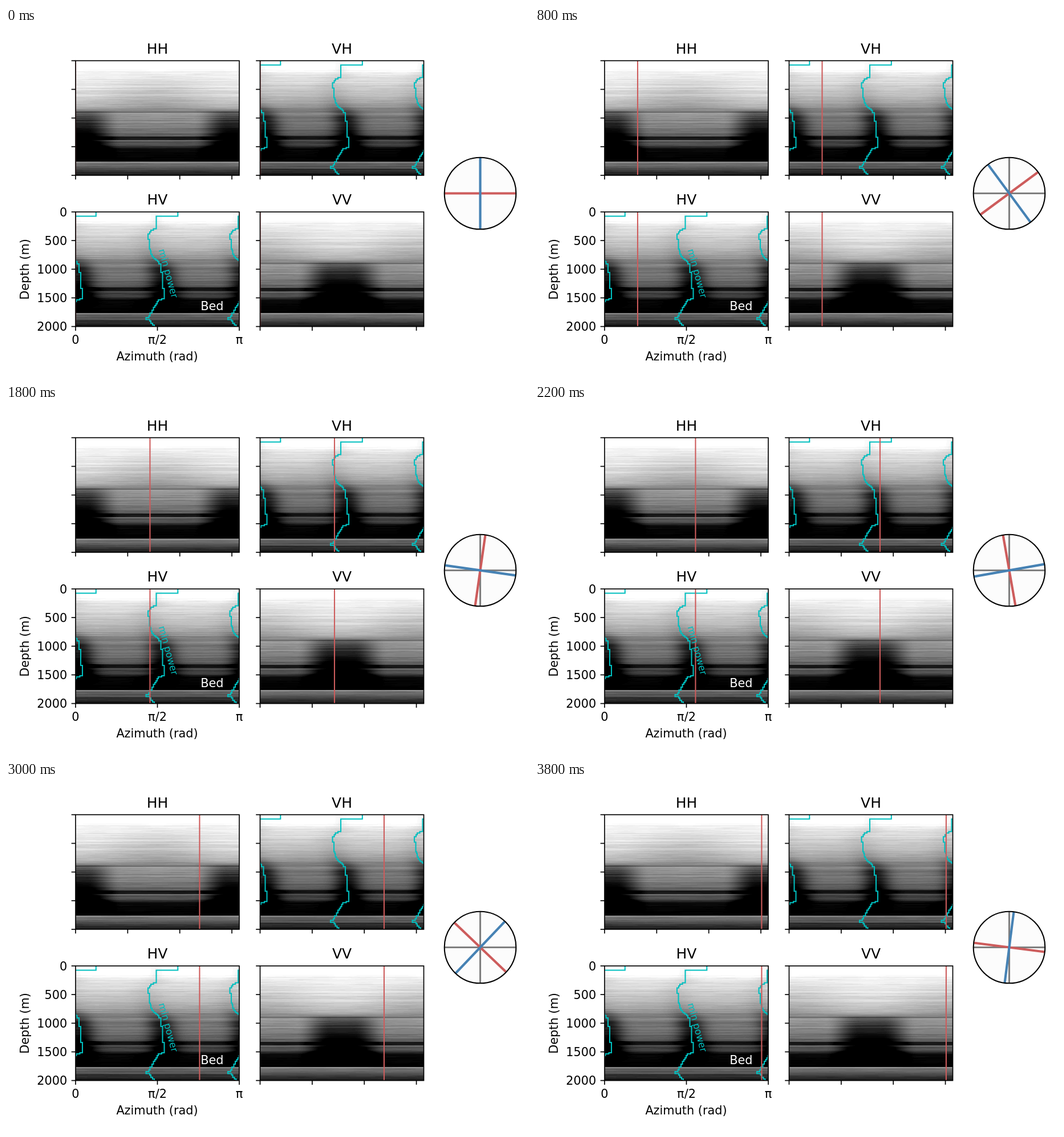
An HTML page with a canvas that plays this animation: 917x611 px, repeating every 4 s.

```html
<!DOCTYPE html>
<html lang="en">
<head>
<meta charset="utf-8">
<title>Polarimetric radar power by azimuth</title>
<style>
html, body { margin: 0; width: 100%; height: 100%; overflow: hidden; background: #fff; }
canvas, svg { position: absolute; left: 0; top: 0; width: 917px; height: 611px; }
text { font-family: "DejaVu Sans", Verdana, sans-serif; font-size: 20.83px; }
</style>
</head>
<body>
<canvas id="echo" width="917" height="611"></canvas>
<svg id="plot" viewBox="0 0 917 611"></svg>
<script>
const W = 287, H = 201, HALF = W / 2, RAD = W / Math.PI;
const TEAL = '#00bfbf', RED = '#cd5c5c', BLUE = '#4682b4';
const STEP = 200, COUNT = 20, TURN = 5 / 99;
const PANELS = [
  { name: 'HH', x: 122, y: 57.3, shift: 0 },
  { name: 'VH', x: 445.5, y: 57.3, cross: true },
  { name: 'HV', x: 122, y: 322, cross: true },
  { name: 'VV', x: 445.5, y: 322, shift: 0.5 }
];

// Grey level against depth
const CO_BASE = [[0, 255], [15, 255], [19, 240], [30, 226], [45, 206], [60, 192], [75, 170],
  [85, 147], [90, 122], [92, 158], [98, 142], [110, 134], [125, 112], [132, 92], [133, 20],
  [138, 20], [139, 110], [142, 78], [147, 72], [150, 40], [154, 9], [175, 0], [176, 0],
  [177, 165], [179, 112], [188, 92], [190, 66], [200, 20]];
const CROSS_BASE = [[0, 255], [15, 255], [22, 238], [30, 222], [45, 205], [60, 190], [75, 164],
  [82, 140], [89, 108], [92, 138], [98, 116], [110, 118], [120, 106], [130, 84], [133, 18],
  [137, 18], [139, 90], [142, 58], [148, 62], [151, 28], [154, 5], [175, 0], [176, 0],
  [177, 152], [179, 106], [188, 80], [190, 55], [200, 15]];
const CO_GAIN = [[15, 0], [45, 22], [80, 25], [90, 0]];
const CO_FADE = [[85, 0], [92, 62], [105, 95], [125, 110], [160, 110], [176, 0]];
const CROSS_FADE = [[8, 8], [20, 14], [45, 12], [75, 22], [88, 50], [98, 90], [150, 100], [176, 0]];

// Depth at which the minimum moves, and its new place
const MINIMA = [[0, 179.3], [7.5, 141.5], [29.5, 136.5], [32, 132], [35, 130], [38.5, 127],
  [48, 129.5], [65, 131], [68, 132], [74, 134], [78, 136.5], [81, 138.5], [82.5, 141],
  [84.5, 144], [87, 146], [91, 149.5], [106, 152.5], [134, 155.5], [152, 151], [154, 145],
  [157, 143], [161, 141], [164, 139], [167, 136.5], [172, 134], [177, 130.5], [182, 128.5],
  [185, 123.5], [188.5, 130], [191, 132], [195, 135], [198, 138]];

function sample(table, d) {
  const i = table.findIndex(p => p[0] > d);
  if (i < 0) return table[table.length - 1][1];
  if (i === 0) return table[0][1];
  const [a, va] = table[i - 1], [b, vb] = table[i];
  return va + (vb - va) * (d - a) / (b - a);
}

function random(seed) {
  return () => {
    seed = seed + 0x6D2B79F5 | 0;
    let t = Math.imul(seed ^ seed >>> 15, 1 | seed);
    t = t + Math.imul(t ^ t >>> 7, 61 | t) ^ t;
    return ((t ^ t >>> 14) >>> 0) / 4294967296;
  };
}

const smooth = t => { t = Math.min(1, Math.max(0, t)); return t * t * (3 - 2 * t); };
const wrap = (v, period) => v - period * Math.round(v / period);

function minimumAt(d) {
  let x = 141.5;
  for (const [from, to] of MINIMA) if (from > 0 && from <= d) x = to;
  return x;
}

function coPolar(u, d) {
  const s = Math.abs(wrap(u, 1));
  return sample(CO_BASE, d)
    + sample(CO_GAIN, d) * (1 + Math.cos(2 * Math.PI * s)) / 2
    - sample(CO_FADE, d) * smooth((0.28 - s) / 0.21);
}

function crossPolar(u, d) {
  const off = wrap(u * W - minimumAt(d), HALF) / W;
  const width = d < 20 ? 0.03 : 0.085;
  return sample(CROSS_BASE, d) - sample(CROSS_FADE, d) * Math.exp(-((off / width) ** 2));
}

// Layered echoes: one offset per row and streaks along it
function paintEcho(ctx, p) {
  const img = ctx.createImageData(W, H);
  const rnd = random(p.cross ? 41 : 17);
  for (let d = 0; d < H; d++) {
    const row = (rnd() + rnd() - 1) * (d < 88 ? 15 : 22);
    const knots = Array.from({ length: 9 }, () => (rnd() - 0.5) * 16);
    for (let x = 0; x < W; x++) {
      const u = (x + 0.5) / W;
      const v = (u + (p.shift || 0)) % 1;
      const k = v * 8, i = Math.floor(k);
      const streak = knots[i] + (knots[(i + 1) % 8] - knots[i]) * smooth(k - i);
      let g = p.cross ? crossPolar(u, d) : coPolar(v, d);
      if (d > 15) g += (row + streak) * Math.min(1, Math.max(0, g + 12) / 60);
      g = Math.round(g / 5) * 5;
      const at = (d * W + x) * 4;
      img.data[at] = img.data[at + 1] = img.data[at + 2] = g;
      img.data[at + 3] = 255;
    }
  }
  ctx.putImageData(img, Math.round(p.x), Math.floor(p.y));
}

const svg = document.getElementById('plot');

function add(tag, attrs, parent = svg) {
  const el = document.createElementNS('http://www.w3.org/2000/svg', tag);
  for (const key in attrs) el.setAttribute(key, attrs[key]);
  parent.appendChild(el);
  return el;
}

function line(x1, y1, x2, y2, stroke, width, parent) {
  return add('line', { x1, y1, x2, y2, stroke, 'stroke-width': width }, parent);
}

function label(str, x, y, attrs = {}) {
  add('text', { x, y, 'text-anchor': 'middle', ...attrs }).textContent = str;
}

function minimumPath(shift) {
  return MINIMA.map(([d, x], i) => (i ? `V${d}H` : 'M') + (x + shift) + (i ? '' : ',0')).join('') + 'V200.5';
}

const ctx = document.getElementById('echo').getContext('2d');
const clip = add('clipPath', { id: 'inside' });
add('rect', { width: 287, height: 200.6 }, clip);

const scans = PANELS.map(p => {
  paintEcho(ctx, p);
  const g = add('g', { transform: `translate(${p.x} ${p.y})` });
  const inner = add('g', { 'clip-path': 'url(#inside)' }, g);
  if (p.cross) {
    for (const shift of [-HALF, 0, HALF])
      add('path', { d: minimumPath(shift), fill: 'none', stroke: TEAL, 'stroke-width': 2.08 }, inner);
  }
  const scan = line(0, 0, 0, 200.6, RED, 2.08, inner);
  for (let i = 0; i < 5; i++) line(-7.3, i * 50.15, 0, i * 50.15, '#000', 1.67, g);
  const ticks = p.name === 'HV' ? [0, HALF, W] : [0, RAD, 2 * RAD, 3 * RAD];
  for (const x of ticks) line(x, 200.6, x, 207.9, '#000', 1.67, g);
  add('rect', { width: W, height: 200.6, fill: 'none', stroke: '#000', 'stroke-width': 1.67 }, g);
  label(p.name, p.x + HALF, p.y - 12.8, { style: 'font-size:25px' });
  return scan;
});

for (let i = 0; i < 5; i++)
  label(i * 500, 107.3, 329.8 + i * 50.15, { 'text-anchor': 'end' });
['0', 'π/2', 'π'].forEach((s, i) => label(s, 122 + i * HALF, 552.7));
label('Azimuth (rad)', 265, 581.8);
label('Depth (m)', 0, 0, { transform: 'translate(40 422.5) rotate(-90)' });
label('Bed', 361.3, 494, { fill: '#fff' });
label('min power', 0, 0, { fill: TEAL, style: 'font-size:16.67px', transform: 'translate(279 431) rotate(75)' });

// Antenna orientation dial
const R = 62.8;
const dial = add('g', { transform: 'translate(831.5 289.5)' });
add('circle', { r: R, fill: '#fcfcfc' }, dial);
line(-R, 0, R, 0, '#7f7f7f', 3.1, dial);
line(0, -R, 0, R, '#7f7f7f', 3.1, dial);
const needle = add('g', {}, dial);
line(-R, 0, R, 0, RED, 4.17, needle);
line(0, -R, 0, R, BLUE, 4.17, needle);
add('circle', { r: R, fill: 'none', stroke: '#000', 'stroke-width': 2.08 }, dial);

const start = performance.now();
function draw() {
  const k = Math.floor((performance.now() - start) / STEP) % COUNT;
  for (const scan of scans) scan.setAttribute('transform', `translate(${k * TURN * W} 0)`);
  needle.setAttribute('transform', `rotate(${-k * TURN * 180})`);
  requestAnimationFrame(draw);
}
draw();
</script>
</body>
</html>
```
